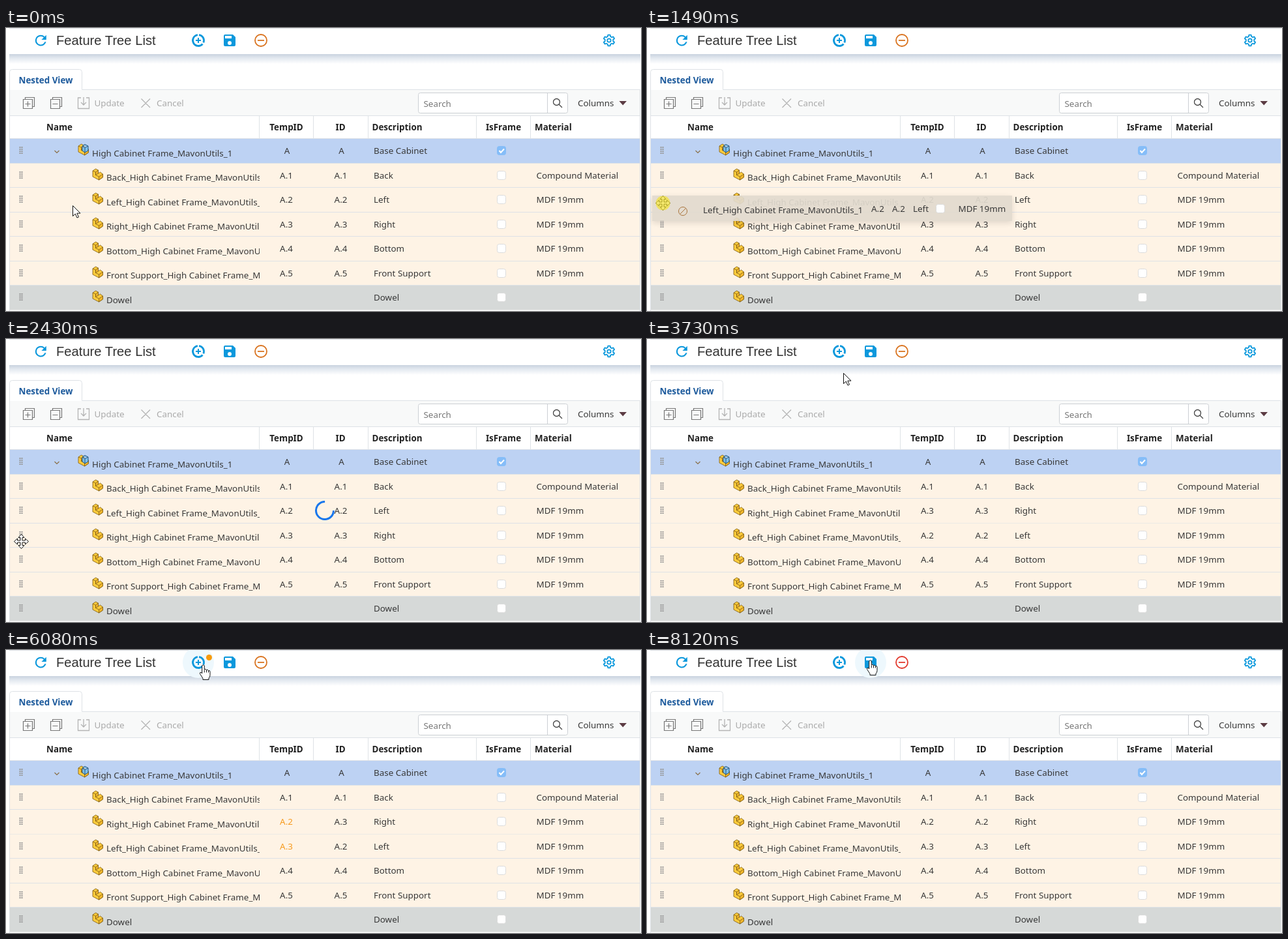
An HTML page for the animation above (9110 ms loop, 974x434 px).

```html
<!DOCTYPE html>
<html lang="en">
<head>
<meta charset="utf-8">
<title>Feature Tree List</title>
<style>
  html, body { margin: 0; width: 100%; height: 100%; overflow: hidden; background: #fff; }
  svg { display: block; width: 100vw; height: 100vh; }
  text { font: 13.4px "Noto Sans", sans-serif; fill: #383838; white-space: pre; }
  .bold { font-weight: 700; fill: #222; }
  .mid { text-anchor: middle; }
  .line { fill: none; stroke: #dee2e6; }
  .blue { fill: #0b98dc; }
  .blueLine { fill: none; stroke: #0b98dc; stroke-width: 1.8; }
  .tool { fill: none; stroke: #777; stroke-width: 1.2; }
  .off { fill: none; stroke: #b4b4b4; stroke-width: 1.3; }
</style>
</head>
<body>
<svg id="stage" viewBox="0 0 974 434">
  <defs>
    <linearGradient id="shade" x2="0" y2="1">
      <stop offset="0" stop-color="#c9d3df"/>
      <stop offset=".4" stop-color="#e2e8ef"/>
      <stop offset="1" stop-color="#fff"/>
    </linearGradient>
    <filter id="lift" x="-5%" y="-50%" width="110%" height="200%">
      <feDropShadow dx="0" dy="3" stdDeviation="5" flood-color="#000" flood-opacity=".13"/>
    </filter>
    <clipPath id="nameClip"><rect x="0" y="-19" width="389" height="38"/></clipPath>
    <g id="part" stroke="#7a5a14" stroke-width=".8" stroke-linejoin="round">
      <path fill="#fdcb3c" d="M.5 4L5 1L9 3V8L12 6L16 9V14L10 18L.5 13Z"/>
      <path fill="#f2b62c" d="M5 6L9 3V8L5 10.500ZM10 13L16 9V14L10 18Z"/>
      <path fill="none" d="M.5 4L5 6V10.500L10 13"/>
    </g>
    <g id="grip" fill="currentColor"></g>
  </defs>

  <rect x="5" y="40" width="968" height="15" fill="url(#shade)"/>
  <rect x="5" width="968" height="40" fill="#fff"/>
  <path class="line" d="M5 .5H973"/>
  <circle id="focus" cy="19" r="24" fill="#eef8fd"/>
  <path class="blue" transform="translate(40.6 6.4) scale(1.06)"
    d="M17.65 6.35A7.96 7.96 0 0 0 12 4a8 8 0 1 0 7.73 10h-2.08A6 6 0 1 1 12 6c1.66 0 3.14.69 4.22 1.78L13 11h7V4z"/>
  <text x="77" y="26" style="font:20.2px 'Liberation Sans',Arial,sans-serif;fill:#333">Feature Tree List</text>
  <g class="blueLine" transform="translate(295 19)">
    <path stroke-width="2.8" style="stroke-width:2.8" d="M1 -8.450A8.500 8.500 0 0 1 7.800 3.400M6.500 5.500A8.500 8.500 0 1 1 -1 -8.450"/>
    <path style="stroke-width:2" d="M0 -4V4M-4 0H4"/>
  </g>
  <path class="blue" transform="translate(331 7)"
    d="M17 3H5a2 2 0 0 0-2 2v14a2 2 0 0 0 2 2h14a2 2 0 0 0 2-2V7l-4-4zm-5 16a3 3 0 1 1 0-6 3 3 0 0 1 0 6zm3-10H5V5h10z"/>
  <g id="remove" fill="none" stroke-width="1.8"><circle cx="391" cy="19" r="9"/><path d="M386 19H396"/></g>
  <g class="blueLine" transform="translate(925 19)"><path id="gear" stroke-linejoin="round"/><circle r="2.700"/></g>
  <circle id="badge" cx="311.5" cy="11.5" r="4.5" fill="#f79a0c"/>

  <rect x="5" y="95" width="968" height="39" fill="#f8f9f9"/>
  <path class="line" d="M5.500 434V67.500Q5.500 63.500 9.500 63.500H112.500Q116.500 63.500 116.500 67.500V94.500H972.500V434M5 134.500H973"/>
  <text class="bold" x="19.500" y="85" style="fill:#1c5a9c">Nested View</text>
  <path class="tool" d="M26.500 109.500H40.500V123.500H26.500ZM29.500 109V106.500H43.500V120.500H41M33.500 112.500V120.500M29.500 116.500H37.500"/>
  <path class="tool" d="M68.500 109.500H82.500V123.500H68.500ZM71.500 109V106.500H85.500V120.500H83M71.500 116.500H79.500"/>
  <path class="off" d="M115 107H110.500V123.500H127.500V107H123M119 106V118M115 114L119 118L123 114M207.500 108.500L221 122M221 108.500L207.500 122"/>
  <text x="135.500" y="120" style="fill:#aaa">Update</text>
  <text x="231" y="120" style="fill:#aaa">Cancel</text>
  <rect x="632.500" y="99.500" width="229" height="31" rx="3" fill="#fff" stroke="#ccd0d4"/>
  <path class="line" style="stroke:#ccd0d4" d="M830.500 100V130"/>
  <text x="640.500" y="121" style="fill:#777">Search</text>
  <g fill="none" stroke="#444" stroke-width="1.3"><circle cx="844.500" cy="113.500" r="5"/><path d="M848 117L853 122"/></g>
  <text x="877" y="120">Columns</text>
  <path fill="#5b3b43" d="M940.500 112H952L946.250 118.500Z"/>
  <path class="line" d="M388.500 135V169M471.500 135V169M555.500 135V169M721.500 135V169M804.500 135V169"/>
  <g id="heads"></g>
  <g id="rows"></g>
  <rect id="drop" x="6" y="283" width="965" height="38" fill="none" stroke="#4a3fd0" stroke-width="2"/>

  <g id="ghost">
    <rect id="ghostBox" y="-11" width="552" height="39" fill="#e2dbcf" opacity=".92" filter="url(#lift)"/>
    <g id="ghostText"></g>
    <g id="denied" fill="none" stroke="#a9743c"><circle cx="31" cy="13" r="6.500"/><path d="M26.500 17.500L35.500 8.500"/></g>
    <use id="allowed" href="#part" x="33.500" y="-5"/>
  </g>
  <path id="spinner" d="M13.500 0A13.500 13.500 0 1 1 0 -13.500" fill="none" stroke="#1876ec" stroke-width="3"/>

  <g id="cursor" stroke="#111" stroke-linejoin="round" fill="#fff">
    <path id="arrow" d="M0 0V16L3.800 12.500L6.500 18.500L9 17.400L6.300 11.600H11.500Z"/>
    <path id="cross"/>
    <circle id="press" r="11" fill="#f3e233" stroke="none" opacity=".7"/>
    <path id="hand" d="M-1.800 1.500Q0 -1 1.800 1.500V7.500Q3.500 6 5 8Q6.800 7 8 9Q10.500 8.500 10.500 11V16Q10.500 19 8.500 20.500V23H-.500V21L-5 14Q-5.500 11.300 -3 12L-1.800 13.500ZM1.800 8V12M5 8.500V12M8 9.500V12"/>
  </g>
</svg>
<script>
const LOOP = 9110;
const $ = id => document.getElementById(id);
const set = (el, attrs) => { for (const key in attrs) el.setAttribute(key, attrs[key]); };
const show = (id, on) => set($(id), { visibility: on ? "visible" : "hidden" });
const place = (el, x, y, extra = "") => set(el, { transform: `translate(${x} ${y})${extra}` });

function add(parent, tag, attrs, content = "") {
  const el = document.createElementNS("http://www.w3.org/2000/svg", tag);
  set(el, attrs);
  el.textContent = content;
  return parent.appendChild(el);
}
const label = (parent, x, y, content, cls = "") => add(parent, "text", { x, y, class: cls }, content);

for (let i = 0; i < 8; i++)
  add($("grip"), "rect", { x: 20.5 + (i % 2) * 3, y: -6 + (i >> 1) * 3, width: 2, height: 2 });

// Six teeth, each with two root and two tip corners
set($("gear"), { d: "M" + Array.from({ length: 24 }, (_, i) => {
  const corner = i % 4, tip = corner === 1 || corner === 2;
  const degrees = 30 + 60 * (i >> 2) + [-18, -11, 11, 18][corner];
  const angle = degrees * Math.PI / 180, radius = tip ? 8.6 : 6.4;
  return [radius * Math.cos(angle), radius * Math.sin(angle)].map(v => v.toFixed(2));
}).join("L") + "Z" });

// One arm of the move cursor, turned four times
let arms = "M";
for (let i = 0, x, y; i < 4; i++)
  for ([x, y] of [[-1.5, -1.5], [-1.5, -6], [-4.5, -6], [0, -11], [4.5, -6], [1.5, -6]]) {
    for (let k = 0; k < i; k++) [x, y] = [-y, x];
    arms += `${x} ${y} `;
  }
set($("cross"), { d: arms + "Z" });

[[62, "Name"], [430, "TempID", 1], [513, "ID", 1], [561.5, "Description"], [763, "IsFrame", 1], [811, "Material"]]
  .forEach(([x, title, mid]) => label($("heads"), x, 157, title, mid ? "bold mid" : "bold"));

const suffix = "_High Cabinet Frame_MavonUtils_1";
const parts = [
  ["Base Cabinet", "A", ""], ["Back", "A.1", "Compound Material"], ["Left", "A.2", "MDF 19mm"],
  ["Right", "A.3", "MDF 19mm"], ["Bottom", "A.4", "MDF 19mm"], ["Front Support", "A.5", "MDF 19mm"], ["Dowel", "", ""]
];

function checkbox(parent, x, y, checked) {
  add(parent, "rect", { x, y, width: 13, height: 13, rx: 3, fill: checked ? "#85bdf8" : "#fff", stroke: checked ? "#85bdf8" : "#dcdcdc" });
  if (checked) add(parent, "path", { d: `M${x + 3} ${y + 6.5}l2.500 3l5 -5.500`, fill: "none", stroke: "#fff", "stroke-width": 2 });
}

const rows = parts.map(([title, code, material], i) => {
  const group = add($("rows"), "g", {}), root = i === 0, last = i === 6;
  add(group, "rect", { x: 6, y: -18, width: 966, height: 37.5, fill: root ? "#bdd2f3" : last ? "#d6d9d8" : "#fef3e5" });
  add(group, "path", { class: "line", d: "M6 -18.500H972" });
  const grip = add(group, "use", { href: "#grip", color: "#969696" });
  if (root) add(group, "path", { d: "M74.500 0L78 3.500L81.500 0", fill: "none", stroke: "#8a7048", "stroke-width": 1.2 });
  add(group, "use", { href: "#part", x: root ? 110.5 : 132.5, y: -11 });
  if (root) add(group, "path", { d: "M117 -7L121 -9.500L126 -7V0L121 3L117 0ZM117 -7L121 -4.500L126 -7M121 -4.500V3", fill: "#7fc2ee", stroke: "#24557d" });
  const name = add(group, "g", { "clip-path": "url(#nameClip)" });
  label(name, root ? 132 : 154, 9, root ? suffix.slice(1) : last ? title : title + suffix);
  const temp = label(group, root ? 431 : 430, 5, code, "mid");
  const id = label(group, root ? 514.5 : 513.5, 5, code, "mid");
  label(group, 564, 5, title);
  checkbox(group, 753.5, -6.5, root);
  label(group, 813.5, 5, material);
  return { group, name, grip, temp, id };
});

[[62, "Left" + suffix], [320, "A.2"], [352, "A.2"], [384, "Left"], [453.5, "MDF 19mm"]]
  .forEach(([x, content]) => label($("ghostText"), x, x === 62 ? 16 : 14, content));
checkbox($("ghostText"), 419.5, 2.5);

const path = [
  [70, 102, 272], [950, 31, 256], [1020, 23, 260], [1160, 23, 262], [1360, 23, 262], [1490, 24, 268],
  [1760, 25, 297], [1960, 24, 309], [2430, 23, 310], [2830, 23, 310], [3730, 301, 52], [3930, 301, 30],
  [4070, 301, 30], [4140, 302, 22], [5090, 302, 22], [5550, 301, 19], [6000, 301, 19], [6080, 302, 22],
  [6710, 343, 20], [6900, 343, 20], [7030, 342, 17], [7780, 342, 17], [7920, 342, 15]
];
function cursorAt(t) {
  const next = path.findIndex(key => key[0] > t);
  if (next < 1) return (next ? path.at(-1) : path[0]).slice(1);
  const [t0, x0, y0] = path[next - 1], [t1, x1, y1] = path[next];
  const u = (t - t0) / (t1 - t0), eased = u * u * (3 - 2 * u);
  return [x0 + (x1 - x0) * eased, y0 + (y1 - y0) * eased];
}

function draw(t) {
  const within = (from, to) => t >= from && t < to;
  const [x, y] = cursorAt(t).map(Math.round);
  const dragging = within(1400, 2430), over = dragging && y > 282;
  const swapped = t >= 2500, numbered = t >= 4840, saved = t >= 7300;

  rows.forEach((row, i) => {
    const slot = swapped && (i === 2 || i === 3) ? 5 - i : i;
    const center = 188 + 37.5 * slot, shift = !over || i < 3 ? 0 : i === 3 ? 1 : 3;
    place(row.group, 0, Math.round(center) + shift);
    place(row.name, 0, Math.floor(center) - Math.round(center));
  });
  set(rows[2].grip, { color: within(950, 2430) ? "#8cc8ea" : "#969696" });
  [2, 3].forEach(i => {
    const before = "A." + i, after = "A." + (5 - i);
    rows[i].temp.textContent = numbered ? after : before;
    rows[i].temp.style.fill = numbered && !saved ? "#f79a1c" : "";
    rows[i].id.textContent = saved ? after : before;
  });

  show("drop", over);
  $("ghost").style.display = dragging ? "" : "none";
  place($("ghost"), x, y);
  set($("ghostBox"), { x: over ? -22 : -16 });
  place($("ghostText"), over ? -7 : 0, 0);
  $("denied").style.display = over ? "none" : "";
  $("allowed").style.display = over ? "" : "none";

  show("spinner", within(2430, 2500) || within(4610, 4840) || within(7170, 7400));
  place($("spinner"), 489, 263, ` rotate(${(t - 2430) * 0.48})`);
  show("focus", t >= 4540);
  set($("focus"), { cx: t < 7170 ? 295 : 343 });
  show("badge", numbered && !saved);
  set($("remove"), { stroke: saved ? "#e23a2e" : "#d9731f" });

  place($("cursor"), x + 0.5, y + 0.5);
  show("arrow", t < 1020 || within(2860, 4100));
  show("cross", within(1020, 2860));
  show("press", within(1360, 2430));
  show("hand", t >= 4100);
}

function tick(now) {
  draw(now % LOOP);
  requestAnimationFrame(tick);
}
draw(0);
requestAnimationFrame(tick);
</script>
</body>
</html>
```
